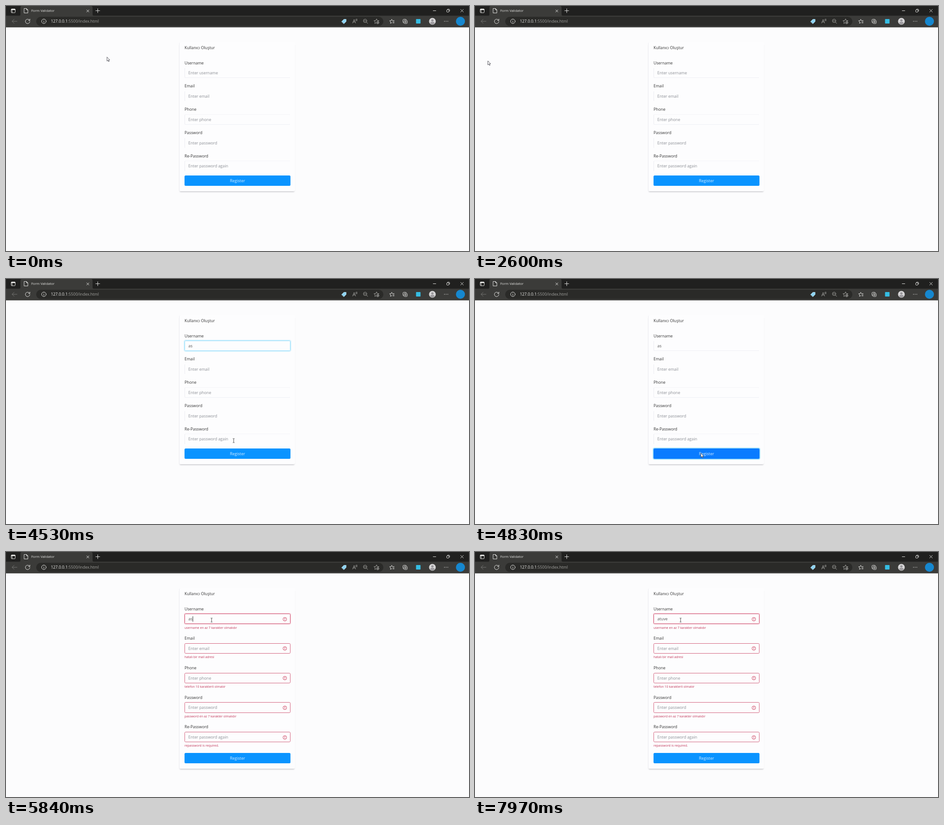
An HTML page for the animation above (8000 ms loop, 1027 by 545 pixels).

```html
<!DOCTYPE html>
<html lang="tr">
<head>
<meta charset="utf-8">
<title>Form Validator</title>
<style>
  html, body { margin: 0; width: 100%; height: 100%; overflow: hidden; }
  body { position: relative; background: #fcfcfd; font: 8.8px/12px "Open Sans", "Noto Sans", sans-serif; color: #333; }
  svg { position: absolute; left: 0; top: 0; overflow: visible; }
  #card, #card div { position: absolute; box-sizing: border-box; white-space: pre; }

  #card {
    --pitch: 51.8px; --button: 295.8px;
    left: 384px; top: 81px; width: 257px; height: 331px;
    border-left: 1px solid #eeeef2; border-radius: 3px;
    background: #fdfdfe; box-shadow: 0 3px 3px -1.5px #c4c4c8;
  }
  #card.checked { --pitch: 65.7px; --button: 365.8px; height: 401px; }
  #card .title { left: 11px; top: 5.5px; }
  #card .row { left: 11px; top: calc(39.5px + var(--i) * var(--pitch)); width: 235px; height: 51px; }
  #card .label { top: 0; }
  #card .field {
    top: 16.8px; width: 100%; height: 23.2px; padding-left: 7.5px;
    line-height: 23.2px; border: 1px solid transparent; border-left-color: #ebecf1;
    border-radius: 2.5px; color: #8b8e94;
  }
  .t .field { border-top-color: #f3f3f7 !important; }
  .b .field { border-bottom-color: #eeeff4 !important; }
  .filled .field { color: #555 !important; }
  .caret { display: inline-block; width: 1px; height: 12px; margin-right: -1px; background: #333; vertical-align: -2.5px; }

  #card .error { top: 42.2px; font-size: 6.95px; color: #c23457; visibility: hidden; }
  #card .alert { right: 7px; top: 6.5px; width: 9px; height: 9px; visibility: hidden; }
  .alert svg { width: 9px; height: 9px; fill: none; stroke: #cb3454; }
  .checked .error, .checked .alert { visibility: visible !important; }
  #card.checked .field { border-color: #d2607c !important; }
  #card .focus .field { border-color: #8ad9fb !important; box-shadow: 0 0 0 2px #d9f3fd; }
  #card.checked .focus .field { border-color: #cb4668 !important; box-shadow: 0 0 0 1.5px #f9dce3; }

  #card .button {
    left: 11px; top: var(--button); width: 235px; height: 22.8px; border-radius: 2.5px;
    background: #0a94ff; color: #d9eeff; font-size: 8.9px; line-height: 24px; text-align: center;
  }
  #card .button.focus { background: #0a7cff; box-shadow: 0 0 0 2px #a5e2fb; }
</style>
</head>
<body>
<svg id="chrome" width="1027" height="48" fill="none" stroke="#e4e4e2" stroke-linecap="round" stroke-linejoin="round">
  <g stroke="none">
    <path fill="#3b3b39" d="M0 0h1027v47.5H0z"/>
    <path fill="#20201f" d="M0 0h1027v21.5H0z"/>
    <path fill="#3b3b39" d="M29 22q3 0 3-4V4q0-4 4-4H188q4 0 4 4v14q0 4 3 4z"/>
    <rect x="67" y="24" width="770" height="20.5" rx="10.2" fill="#2a2a28"/>
    <text x="56" y="13.3" font-size="7.5" fill="#e2e2e0">Form Validator</text>
    <text x="99.5" y="37.2" font-size="8.8" fill="#f0f0ee">127.0.0.1<tspan fill="#a2a29f">:5500/index.html</tspan></text>
  </g>
  <!-- tab strip -->
  <rect x="11.5" y="6.5" width="9" height="8.5" rx="1.5"/>
  <path stroke-width="2" d="M12 8h8"/>
  <path d="M13.7 9v5.5M40.5 5.5h5l3 3v7h-8zM45.5 5.5v3h3"/>
  <path d="M179 8.5l5 5m0-5l-5 5M199 10.5h9m-4.5-4.5v9"/>
  <path d="M947.5 10.5h6M1008.5 7.500l6 6m0-6l-6 6"/>
  <rect x="977.5" y="8.5" width="5" height="5" rx="1"/>
  <path d="M979.5 7h3q1.5 0 1.5 1.5v3"/>
  <!-- address row -->
  <path stroke="#777774" d="M24.5 34h-11m4.500-4.500l-4.500 4.500 4.500 4.500"/>
  <path d="M52.5 32a5 5 0 1 0 .5 2.500M53 29v3.200h-3.200"/>
  <circle cx="84" cy="34" r="5"/>
  <path d="M84 33.500v3M84 31.300v.1"/>
  <path fill="#8ed3f2" stroke="#c9ecfa" stroke-width=".7" d="M744.500 34.500l5-5h5v5l-5 5z"/>
  <g stroke="#b5b5b2" stroke-width=".9">
    <path d="M769 38l3.200-8 3.200 8m-1.200-2.700h-4M776 29.500q1 1.500 0 3M778 28.500q1.500 2.500 0 5"/>
    <circle cx="796.5" cy="33" r="3.7"/>
    <path d="M799.300 35.800l3 3M794.800 33h3.400"/>
    <path d="M822 29l1.600 3.300 3.700.4-2.500 2M820 38l-1.800 1 .7-3.700-2.600-2.600 3.700-.4L822 29"/>
    <circle cx="824.5" cy="37" r="2.7"/>
    <path d="M823.300 37h2.400m-1.200-1.200v2.400"/>
  </g>
  <path d="M857 32.500l-1.400-3-1.400 3-3.400.4 2.500 2.300-.6 3.400 3-1.600M858 32.500h3m-3 2.500h3m-3 2.500h3"/>
  <path d="M882.500 37.500q-2 0-2-2v-4q0-2 2-2h4q1.500 0 1.500 1.500"/>
  <rect x="883" y="32" width="7" height="7" rx="1.5"/>
  <path d="M884.800 35.500h3.400m-1.700-1.700v3.400"/>
  <g stroke="none">
    <rect x="909.5" y="29" width="10" height="10" rx="1" fill="#35bde3"/>
    <circle cx="945.8" cy="34" r="7.5" fill="#d6d5d6"/>
    <circle cx="945.8" cy="32" r="2.6" fill="#98969a"/>
    <path fill="#98969a" d="M940.800 38.500q0-3 5-3t5 3q-5 4-10 0z"/>
    <circle cx="1008" cy="34" r="10" fill="#1687cf"/>
  </g>
  <path stroke-width="1.5" d="M972.500 34h.1M976.200 34h.1M979.900 34h.1"/>
</svg>

<div id="card">
  <div class="title">Kullanıcı Oluştur</div>
  <div class="button">Register</div>
</div>

<svg id="pointer" width="1" height="1">
  <path id="arrow" fill="#fff" stroke="#45454d" stroke-width=".9" d="M.5.5v9l2.100-1.900 1.500 3.200 1.400-.7-1.500-3.100h2.700z"/>
  <path id="beam" fill="none" stroke="#444" d="M-2-4.500h1.500L0-4l.5-.5H2M0-4v8M-2 4.500h1.500L0 4l.5.5H2"/>
</svg>

<script>
const LOOP = 8000;
const $ = s => document.querySelector(s);
const card = $('#card'), button = $('.button'), pointer = $('#pointer');

// label, placeholder, error, visible idle edges
const rows = [
  ['Username', 'Enter username', 'username en az 7 karakter olmalıdır', 'b'],
  ['Email', 'Enter email', 'hatalı bir mail adresi', ''],
  ['Phone', 'Enter phone', 'telefon 10 karakterli olmalıir', 't b'],
  ['Password', 'Enter password', 'password en az 7 karakter olmalıdır', ''],
  ['Re-Password', 'Enter password again', 'repassword is required.', 't']
];
const alertIcon = '<svg viewBox="0 0 9 9"><circle cx="4.5" cy="4.5" r="4"/><path d="M4.5 2v3M4.5 6v1"/></svg>';
rows.forEach(([label, hint, error, edges], i) => {
  card.insertAdjacentHTML('beforeend',
    `<div class="row ${edges}" style="--i:${i}">` +
    `<div class="label">${label}</div>` +
    `<div class="field"><span>${hint}</span><div class="alert">${alertIcon}</div></div>` +
    `<div class="error">${error}</div></div>`);
});
const userRow = $('.row'), userText = $('.field span');

// time, focused part, typed text, caret shown
const states = [
  [0, '', '', 0],
  [2800, 'user', '', 1],
  [3630, 'user', '', 0],
  [3830, 'user', 'a', 1],
  [3930, 'user', 'as', 1],
  [4530, 'user', 'as', 0],
  [4800, 'button', 'as', 0],
  [5740, 'user', 'as', 1],
  [6400, 'user', 'as', 0],
  [6770, 'user', 'a', 1],
  [6830, 'user', 'at', 1],
  [6900, 'user', 'atu', 1],
  [7270, 'user', 'atuv', 1],
  [7440, 'user', 'atuve', 1],
  [7940, 'user', 'atuve', 0]
];
const CHECK_AT = 5100;

// time, shape, x, y
const moves = [
  [0, 'arrow', 223.5, 113],
  [900, 'arrow', 28, 121.5],
  [2630, 'beam', 426, 151.5],
  [3300, 'beam', 429, 150],
  [3330, 'beam', 431, 149.5],
  [3830, '', 0, 0],
  [4330, 'beam', 480, 306],
  [4370, 'beam', 497, 348],
  [4530, 'beam', 505, 359.5],
  [4770, 'arrow', 500.5, 387],
  [5140, 'beam', 605, 280],
  [5370, 'arrow', 540, 237],
  [5400, 'arrow', 455, 189],
  [5740, 'beam', 456, 151.5]
];

const at = (list, t) => list.findLast(e => e[0] <= t);
let shown = '';

function drawForm(t) {
  const [, focus, text, caret] = at(states, t), checked = t >= CHECK_AT;
  const key = [focus, text, caret, checked].join();
  if (key === shown) return;
  shown = key;
  card.classList.toggle('checked', checked);
  button.classList.toggle('focus', focus === 'button');
  userRow.classList.toggle('focus', focus === 'user');
  userRow.classList.toggle('filled', text !== '');
  const mark = caret ? '<i class="caret"></i>' : '';
  userText.innerHTML = text ? text + mark : mark + rows[0][1];
}

function drawPointer(t) {
  let [, shape, x, y] = at(moves, t);
  if (t >= 500 && t < 900) {
    const k = 1 - (1 - (t - 470) / 430) ** 2;
    x += (moves[1][2] - x) * k;
    y += (moves[1][3] - y) * k;
  }
  pointer.style.transform = `translate(${x}px, ${y}px)`;
  for (const id of ['arrow', 'beam']) $('#' + id).style.display = id === shape ? '' : 'none';
}

const start = performance.now();
function frame() {
  const t = (performance.now() - start) % LOOP;
  drawForm(t);
  drawPointer(t);
  requestAnimationFrame(frame);
}
frame();
</script>
</body>
</html>
```
